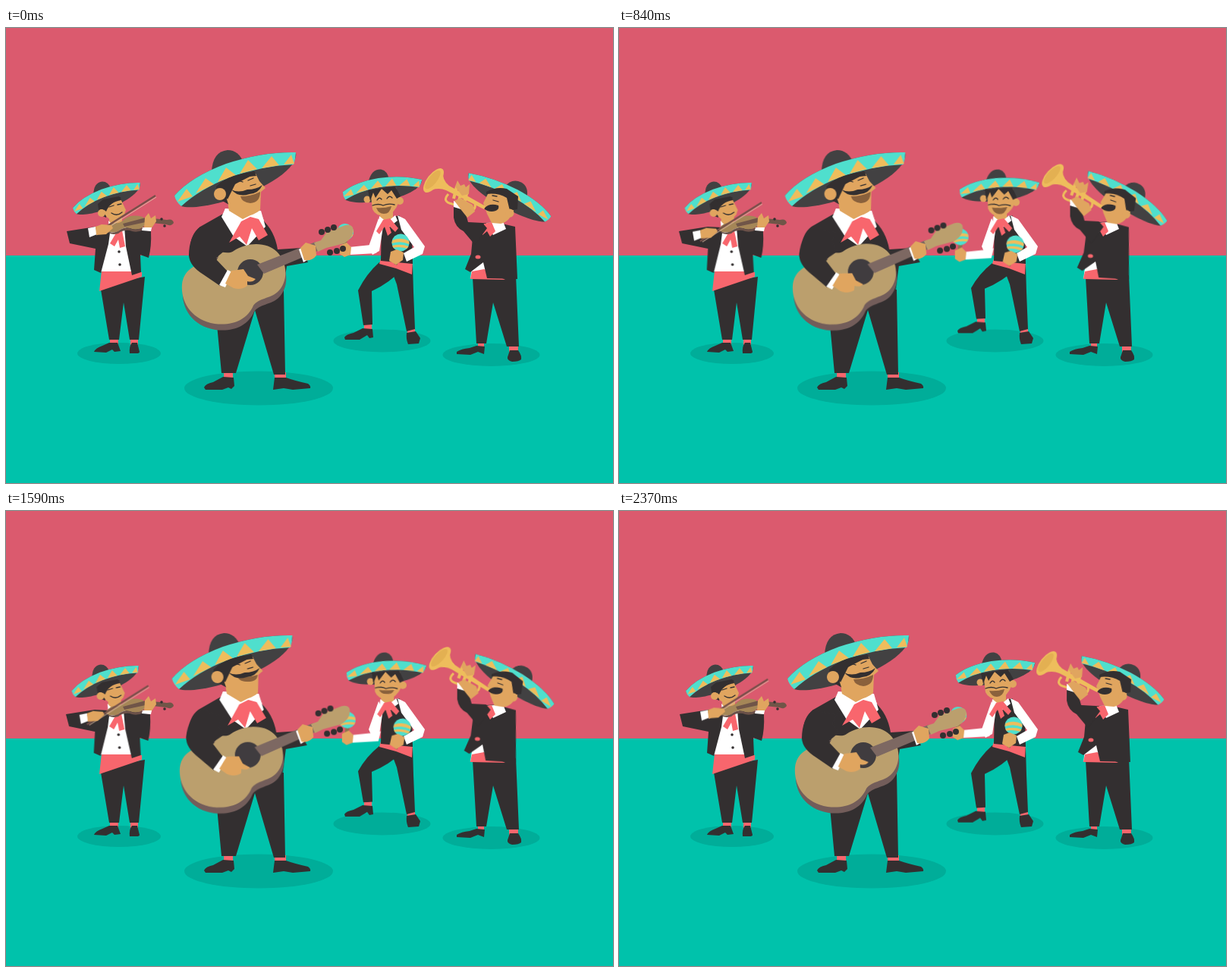
Recreate the animation shown at these times as an HTML page. Size 800x600 px, loop 2400 ms.

```html
<!DOCTYPE html>
<html lang="en">
<head>
<meta charset="utf-8">
<title>Mariachi band</title>
<style>
html, body { margin: 0; width: 100%; height: 100%; overflow: hidden; background: #db5a6e; }
svg { display: block; width: 800px; height: 600px; }

.k { fill: #332f30; }
.d { fill: #424142; }
.s { fill: #e0a55f; }
.w { fill: #fff; }
.r { fill: #f8666d; }
.t { fill: #4fdfcd; }
.y { fill: #eebd5c; }
.g { fill: #bb9f6d; }
.b { fill: #735d5a; }
.m { fill: #8a613c; }
.line { fill: none; stroke: #332f30; stroke-width: 1.3; stroke-linecap: round; }

/* Each part swings from rest to its --to pose and back. */
.slow, .nod, .beat, .tap, .bow {
  animation: swing 1200ms cubic-bezier(.3, 0, .1, 1) infinite alternate;
}
.nod { animation-timing-function: cubic-bezier(.25, 0, .5, 1); }
.beat { animation-duration: 600ms; animation-timing-function: cubic-bezier(.2, 0, .1, 1); }
.tap { animation-duration: 300ms; animation-timing-function: cubic-bezier(.3, 0, .4, 1); }
.bow { animation-duration: 600ms; animation-timing-function: cubic-bezier(.1, 0, .1, 1); }
@keyframes swing { from { transform: none; } to { transform: var(--to); } }

.mouth { transform-box: fill-box; transform-origin: 50% 0; animation: sing 2400ms ease-in-out infinite; }
@keyframes sing {
  0%, 6%, 34%, 48%, 100% { transform: none; }
  16%, 23%, 64%, 87% { transform: scaleY(.62); }
}

#v-body { --to: skewX(.9deg); transform-origin: 0 340px; }
#v-bow { --to: translate(-10px, 10px); }
#v-hand { --to: translate(-12px, 5px); }
#m-head { --to: translate(3px, .5px) rotate(4.5deg); transform-origin: 500px 250px; }
#m-tie { --to: translate(1.5px, 0); }
#m-leg { --to: scaleY(.885); transform-origin: 0 318px; }
#m-foot { --to: translateY(-9px); }
#m-arm { --to: translate(3px, 7px); }
#m-shake { --to: translate(1px, 2px) rotate(4deg); transform-origin: 516px 303px; }
#t-head { --to: translate(4.5px, 0) rotate(5deg); transform-origin: 645px 250px; }
#t-arm { --to: translate(5px, -2px); }
#t-coat { --to: translate(1px, 0) rotate(2.5deg); transform-origin: 655px 262px; }
#g-body { --to: skewX(1.4deg); transform-origin: 0 365px; }
#g-guitar { --to: translate(-3px, .5px) rotate(-1.2deg); transform-origin: 280px 345px; }
#g-arm { --to: rotate(6.5deg); transform-origin: 258px 265px; }
</style>
</head>
<body>
<svg viewBox="0 0 800 600">
  <defs>
    <g id="hat">
      <path class="d" d="M271 190Q272 163 292 161Q307 161 313 178L310 200L275 207Z"/>
      <path class="d" d="M222 221Q244 196 290 179Q338 163 382 164C386 184 345 212 290 228C255 238 238 237 231 235Z"/>
      <path class="t" d="M222 221Q244 196 290 179Q338 163 382 164Q382 172 379 180Q336 182 295 197Q256 212 231 235Q224 229 222 221Z"/>
      <path class="y" d="M226 229L238 212L246 222ZM250 218L263 198L274 206ZM279 203L290 184L303 194ZM308 192L319 174L331 186ZM337 185L350 169L360 181ZM366 180L376 167L380 179Z"/>
    </g>
    <g id="maraca">
      <path d="M-3 9L3 9L-2 30L-6 29Z" fill="#8d7350"/>
      <circle class="t" r="11.5"/>
      <path class="y" d="M-11 -2Q0 -8 11 -3L11.3 1Q0 -3 -11.4 2ZM-10.5 5Q0 1 11 4L9 7Q0 5 -9 7.5Z"/>
    </g>
    <path id="guitar" d="M266 310C280 308 284 302 274 293Q294 299 300 294C320 281 345 283 357 295C372 310 372 335 358 348C348 357 333 356 326 366C318 385 298 393 275 390C245 385 230 362 232 338C234 320 248 311 266 310Z"/>
  </defs>

  <rect width="800" height="600" fill="#db5a6e"/>
  <rect y="300" width="800" height="300" fill="#00c2ab"/>
  <g fill="#00ad99">
    <ellipse cx="149" cy="429" rx="55" ry="14"/>
    <ellipse cx="495.500" cy="412.500" rx="64" ry="15"/>
    <ellipse cx="639.500" cy="431" rx="64" ry="15"/>
    <ellipse cx="333" cy="475" rx="98" ry="22.500"/>
  </g>

  <!-- Violin -->
  <g>
    <path class="r" d="M137 409H148V418H137ZM164 409H174V418H164Z"/>
    <path class="k" d="M125 345L136 411H149L155 362L163 411H175L183 328L127 338Z"/>
    <path class="k" d="M116 427Q118 422 127 419L136 415H147L151 426L143 427L140 424L132 428ZM163 429Q162 420 166 415H173L176 427Q176 429 172 429Z"/>
    <path class="r" d="M123 347L126 320H165L179 322V328Z"/>
    <g id="v-body" class="slow">
      <path class="w" d="M130 266L157 264L166 321H125Z"/>
      <circle class="k" cx="149" cy="295" r="1.800"/><circle class="k" cx="150" cy="312" r="1.800"/>
      <path class="k" d="M80 268L118 262L138 263L135 285L125 323L116 319L118 291L84 284Z"/>
      <path class="k" d="M156 262L180 266L191 268Q192 288 188 303L177 299L178 322L166 326L158 288Z"/>
      <path class="s" d="M136 246H153V262L146 268L136 260Z"/>
      <path class="w" d="M135 254L146 266L155 256L159 265L149 272L136 267Z"/>
      <path class="r" d="M147 267L137 284L143 288L148 279L150 290L157 288L153 267Z"/>
      <use href="#hat" transform="matrix(.555 0 0 .58 -35.200 109)"/>
      <path class="k" d="M121 232L128 226L149 222L154 230L134 236L132 250L123 246Z"/>
      <path class="s" d="M129 233L151 225L156 236L158 240L156 246Q150 254 140 254Q131 250 129 242Z"/>
      <circle class="s" cx="126" cy="244" r="5"/>
      <path class="k" d="M124 230L151 223L152 227Q137 229 132 242L127 238Z"/>
      <path class="line" d="M136 236L142 234M147 233L152 232M139 244Q146 249 153 243"/>
    </g>
    <path d="M131 266Q136 257 145 257Q151 258 156 252Q165 245 180 249Q188 256 180 263Q172 268 163 264Q154 262 148 268Q138 272 131 266Z" fill="#a58657"/>
    <path d="M132 267Q138 272 148 268Q154 262 163 264Q172 268 182 262L181 266Q172 271 163 267Q154 266 148 271Q137 274 132 267Z" fill="#6b5149"/>
    <path d="M154 258L184 250L212 253Q220 251 221 257Q218 262 211 259L184 256L156 262Z" fill="#705548"/>
    <circle class="k" cx="205" cy="252" r="1.800"/><circle class="k" cx="209" cy="261" r="1.800"/>
    <g id="v-bow" class="bow">
      <path d="M116 272L197 221" stroke="#75504a" stroke-width="2.200"/>
      <path d="M119 273L198 223" stroke="#dcb9a2"/>
    </g>
    <g id="v-hand" class="bow">
      <path class="w" d="M108 264L118 262L120 272L110 276Z"/>
      <path class="s" d="M118 262L126 259L139 260L141 264L132 272L119 273Z"/>
    </g>
    <path class="s" d="M182 265L183 250L188 244L191 251L197 247L198 255L191 265Z"/>
    <path class="w" d="M180 263H192L191 268L179 267Z"/>
  </g>

  <!-- Maracas -->
  <g>
    <path class="r" d="M529 395H539V404H529Z"/>
    <path class="k" d="M506 314L536 312L537 348L539 397L528 400L515 338Z"/>
    <path class="k" d="M528 402L540 400L546 409L544 416L530 417Q527 410 528 402Z"/>
    <g id="m-foot" class="tap">
      <path class="r" d="M472 388H482V399H472Z"/>
      <path class="k" d="M446 408Q448 404 458 402L470 396L483 397L484 408L479 409L476 405L466 411H447Z"/>
    </g>
    <path id="m-leg" class="k tap" d="M492 309L522 318Q506 336 482 347L483 391L471 392L464 346Q475 324 492 309Z"/>
    <path class="r" d="M494 304L536 308L535 325L514 317L492 311Z"/>
    <path class="k" d="M495 254L518 247L535 272L536 311L494 307Z"/>
    <path class="w" d="M491 251L497 262L492 294L483 299L478 288Z"/>
    <g id="m-arm" class="beat">
      <use href="#maraca" transform="translate(447 269) rotate(-3) scale(.95)"/>
      <path class="w" d="M452 289L481 286L491 284L488 297L453 299Z"/>
      <path class="s" d="M440 287L449 283L455 289L454 299L446 302L440 298Z"/>
    </g>
    <path class="w" d="M516 247L526 252L552 288L549 298L528 308L524 297L538 289L521 266Z"/>
    <g id="m-shake" class="beat">
      <use href="#maraca" transform="translate(520 283) rotate(5)"/>
      <path class="s" d="M507 295L515 292L524 296L523 306L514 312L505 307Z"/>
    </g>
    <g id="m-tie" class="nod">
      <path class="s" d="M493 242H510V252L501 258L493 252Z"/>
      <path class="w" d="M492 248L502 256L513 247L516 254L503 264L491 258Z"/>
      <path class="r" d="M497 253L488 268L492 272L499 262L503 274L508 270L505 261L513 269L517 264L506 251Z"/>
    </g>
    <g id="m-head" class="nod">
      <use href="#hat" transform="translate(496 208.500) rotate(12) scale(.618 .66) translate(-302 -193)"/>
      <circle class="s" cx="476" cy="226" r="4.500"/><circle class="s" cx="519" cy="228" r="5"/>
      <path class="s" d="M480 214L514 210L517 231Q512 245 500 248Q487 248 483 239Z"/>
      <path class="k" d="M477 214L513 209L520 222L515 225L508 214L503 219L495 212L487 224L484 217L480 228Z"/>
      <path class="line" d="M483 234Q491 231 497 234Q504 231 512 233M489 227Q492 222 495 226M502 225Q505 220 509 224"/>
      <path class="m mouth" d="M488 237Q498 238 508 235Q506 245 498 245Q491 245 488 237Z"/>
    </g>
  </g>

  <!-- Trumpet -->
  <g>
    <path class="r" d="M622 413H630V423H622ZM663 417H675V428H663Z"/>
    <path class="k" d="M615 329L620 416H633L642 362L660 420H676L672 326Z"/>
    <path class="k" d="M594 427Q600 423 611 422L620 419L631 420L630 430L622 427L612 431L594 430ZM664 425H675Q680 432 679 437Q676 440 667 440Q660 438 661 434Z"/>
    <path class="w" d="M616 302L634 300V331H612Z"/>
    <path class="r" d="M614 321L630 318L658 332L612 331Z"/>
    <g id="t-coat" class="beat">
      <path class="k" d="M618 258L645 256L671 262L674 331L634 330L629 309L612 322L605 318L613 298L615 276Z"/>
      <ellipse class="r" cx="622" cy="302" rx="3.500" ry="2.500"/>
    </g>
    <path class="w" d="M633 257L655 255L659 265L642 273Z"/>
    <path class="r" d="M630 258L640 256L645 268L638 275L634 268L628 273L625 267Z"/>
    <g id="t-head" class="beat">
      <use href="#hat" transform="translate(664 220) rotate(11) scale(-.735 .62) translate(-302 -193)"/>
      <path class="s" d="M629 231L636 217L660 214L670 238Q664 256 652 258L640 257L634 245Z"/>
      <path class="k" d="M633 216Q646 209 660 212L675 222L674 239L664 241L660 224Q648 217 633 219Z"/>
      <circle class="s" cx="664" cy="244" r="5.500"/>
      <path class="k" d="M630 238Q637 230 649 234Q651 241 640 242Q634 242 630 238Z"/>
      <path class="line" d="M642 227L649 229M641 221L647 222"/>
      <g class="y">
        <path d="M576 186Q574 200 584 208L632 235L630 239L580 214Q568 209 552 217Z"/>
        <ellipse cx="563.500" cy="201" rx="8.500" ry="19" transform="rotate(38 563.500 201)"/>
      </g>
      <ellipse cx="562.500" cy="200" rx="5.500" ry="15" transform="rotate(38 562.500 200)" fill="#e3b052"/>
      <path d="M583 219Q574 229 588 232L610 242Q620 240 618 232" fill="none" stroke="#eebd5c" stroke-width="3"/>
      <path d="M594 209L590 225M601 212L597 228M608 215L604 231" stroke="#eebd5c" stroke-width="4"/>
      <path class="s" d="M592 209L595 201L599 208L604 206L606 210L611 206L610 219L601 221Z"/>
    </g>
    <g id="t-arm" class="beat">
      <path class="k" d="M590 233L604 238L609 256L628 257L634 264L618 286L603 268Q592 263 590 250Z"/>
      <path class="w" d="M590 228L604 233L603 240L590 236Z"/>
      <path class="s" d="M591 228L599 224L615 233L618 242L608 250L600 240Z"/>
    </g>
  </g>

  <!-- Guitar -->
  <g>
    <path class="r" d="M287 452H299V463H287ZM354 454H369V464H354Z"/>
    <path class="k" d="M276 370L278 345H366L368 457H353L328 372L303 455H284Z"/>
    <path class="k" d="M261 474Q263 469 273 467L286 460L300 461L301 472L297 476L293 474L285 477H263ZM354 461H369Q380 465 398 469Q402 472 401 475L378 477L366 475L352 477Z"/>
    <g id="g-body" class="slow">
      <path class="k" d="M286 245L256 262Q243 272 243 290L262 350L280 370L364 353L370 314L398 309L389 290L358 292Q354 267 337 252Z"/>
      <path class="w" d="M289 238L284 249L300 275L318 288L342 262L336 241Z"/>
      <path class="s" d="M292 228L335 225V239Q326 252 312 253L294 242Z"/>
      <path class="w" d="M289 238L312 252L334 241L340 254L315 263L285 250Z"/>
      <path class="r" d="M294 283L310 255L322 249L333 252L345 273L333 280L324 264L317 286L308 275Z"/>
      <use href="#hat"/>
      <path class="k" d="M277 209Q296 191 328 190L331 202L300 210L294 233L280 225Z"/>
      <path class="s" d="M292 211L329 192L334 202L342 211L336 216L335 240Q322 251 307 246Q294 240 291 226Z"/>
      <path class="k" d="M282 204L327 189L330 195Q309 196 302 206L292 226L284 212Z"/>
      <circle class="s" cx="282" cy="219" r="8"/>
      <path class="line" d="M300 205Q306 200 312 203M319 201L326 198M322 208L329 206"/>
      <path class="m mouth" d="M309 222Q323 222 335 216Q335 230 322 231Q311 230 309 222Z"/>
      <path class="k" d="M297 213Q306 218 318 213Q330 213 338 207Q333 218 321 219Q306 224 297 213Z"/>
    </g>
    <g id="g-guitar" class="slow">
      <use href="#guitar" class="b" x="1" y="8"/>
      <use href="#guitar" class="g"/>
      <circle cx="322" cy="322" r="17" fill="#403c3f"/>
      <path d="M331 312L408 282L413 293L340 324Z" fill="#7d6862"/>
      <path class="g" d="M406 283L415 280L423 269L442 262Q453 257 457 263Q460 275 446 284L422 290L411 295Z"/>
      <g class="k">
        <circle cx="416" cy="269" r="4"/><circle cx="424" cy="266" r="4"/><circle cx="432" cy="263" r="4"/>
        <circle cx="427" cy="296" r="4"/><circle cx="436" cy="294" r="4"/><circle cx="444" cy="291" r="4"/>
      </g>
      <path class="w" d="M386 292L391 289L397 306L392 309Z"/>
      <path class="s" d="M388 290L395 283L408 287L409 300Q403 308 393 306Z"/>
    </g>
    <g id="g-arm" class="beat">
      <path class="k" d="M256 262Q241 275 241 300Q242 314 260 325L282 340L293 322L276 304L290 292L282 280L288 268Z"/>
      <path class="w" d="M281 339L292 319L298 322L289 342Z"/>
      <path class="s" d="M289 337L297 320L313 318L319 327L329 331Q325 336 318 334V340Q310 346 300 343Z"/>
    </g>
  </g>
</svg>
</body>
</html>
```
